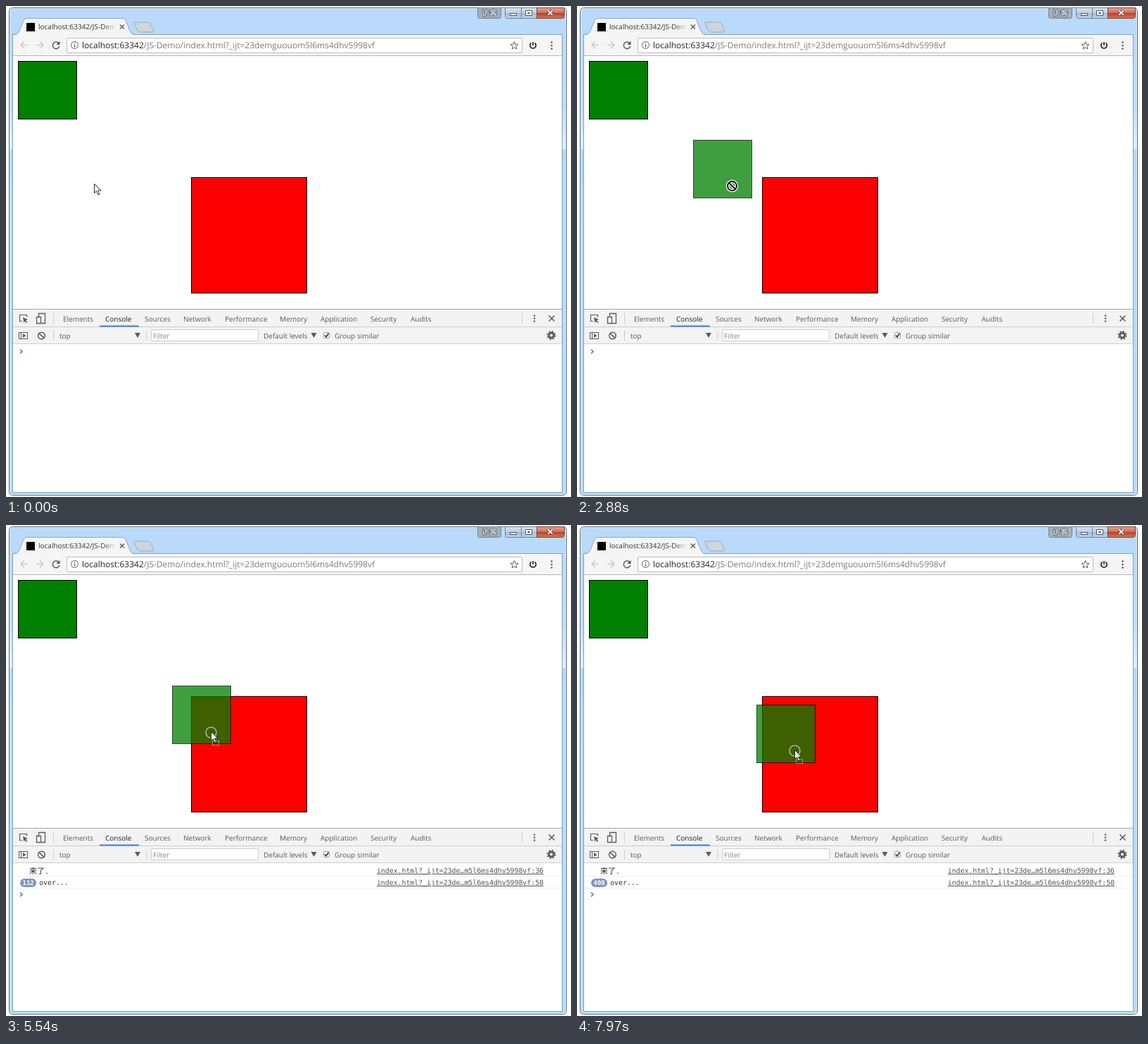
These frames come from a looping animation (803x697 px, 8000 ms). An HTML page:

```html
<!DOCTYPE html>
<html lang="en">
<head>
<meta charset="utf-8">
<title>Drag and drop demo</title>
<style>
html, body { margin: 0; width: 100%; height: 100%; overflow: hidden; background: #fff; }
svg { display: block; width: 803px; height: 697px; }
text { font: 10px "Open Sans", "Noto Sans", sans-serif; fill: #5a5a5a; white-space: pre; text-rendering: geometricPrecision; }
.url { font-size: 12px; }
.mono { font: 9.85px "DejaVu Sans Mono", monospace; fill: #303030; }
.link { fill: #545454; text-anchor: end; text-decoration: underline; }
.cjk { font: 11px "Noto Sans CJK SC", "Noto Sans CJK", sans-serif; fill: #222; }
.badge { font: bold 9px "DejaVu Sans Mono", monospace; fill: #fff; }
.line { fill: none; stroke: #5a5a5a; }
</style>
</head>
<body>
<svg viewBox="0 0 803 697" xmlns="http://www.w3.org/2000/svg">
  <defs>
    <linearGradient id="glass" x2="0" y2="1">
      <stop offset="0" stop-color="#b9dafb"/>
      <stop offset=".2" stop-color="#bcdcfc"/>
      <stop offset=".29" stop-color="#e3f0fd"/>
      <stop offset=".29" stop-color="#b0d9f9"/>
      <stop offset=".45" stop-color="#b7dcfb"/>
      <stop offset="1" stop-color="#b7dcfb"/>
    </linearGradient>
    <linearGradient id="button" x2="0" y2="1">
      <stop offset="0" stop-color="#d3e3f4"/>
      <stop offset=".5" stop-color="#bccfe3"/>
      <stop offset=".5" stop-color="#a3bad2"/>
      <stop offset="1" stop-color="#bdd5ec"/>
    </linearGradient>
    <linearGradient id="close" x2="0" y2="1">
      <stop offset="0" stop-color="#e2a294"/>
      <stop offset=".5" stop-color="#cf6c58"/>
      <stop offset=".5" stop-color="#b93d24"/>
      <stop offset="1" stop-color="#d47a55"/>
    </linearGradient>
    <linearGradient id="fade" gradientUnits="userSpaceOnUse" x1="138" x2="157">
      <stop offset="0" stop-color="#333"/>
      <stop offset="1" stop-color="#333" stop-opacity="0"/>
    </linearGradient>
  </defs>

  <!-- window frame -->
  <rect x="4.5" y="2.5" width="792" height="692" rx="5" fill="url(#glass)" stroke="#566b80"/>
  <rect x="5.5" y="3.5" width="790" height="690" rx="4" fill="none" stroke="#e6f3ff" stroke-opacity=".8"/>
  <g stroke="#6f8294">
    <path d="M670.5 2.5h33v12q0 3-3 3h-27q-3 0-3-3z" fill="#a4b1bf"/>
    <path d="M709.5 2.5h45v15h-42q-3 0-3-3z" fill="url(#button)"/>
    <path d="M732.5 3v14" fill="none"/>
    <path d="M754.5 2.5h39v12q0 3-3 3h-36z" fill="url(#close)" stroke="#7c4238"/>
  </g>
  <text class="cjk" x="676" y="14" style="fill:#fff;stroke:#5c6874;stroke-width:1.6px;paint-order:stroke">访客</text>
  <g fill="#fff" stroke="#4e5a68">
    <rect x="716.5" y="10.5" width="9" height="3"/>
    <path d="M738.5 6.5h9v7h-9zM741.5 9.5v1h3v-1z" fill-rule="evenodd"/>
    <path d="M770.5 6.5l6 6M776.5 6.5l-6 6" stroke="#6b3a34" stroke-width="4"/>
    <path d="M770.5 6.5l6 6M776.5 6.5l-6 6" stroke="#fff" stroke-width="2"/>
  </g>

  <!-- tab strip and toolbar -->
  <rect x="9.5" y="40.5" width="781" height="650" fill="#fff" stroke="#7fa0c0"/>
  <path d="M182 25q-1-2 2-2h18q2 0 3 2l5 10q0 2-2 2h-17q-3 0-4-2z" fill="#cdd5dd" stroke="#99a9ba"/>
  <rect x="10" y="41" width="780" height="29" fill="#f5f5f5"/>
  <path d="M10 41.5q6 0 8-4l7-17q1-3 5-3h135q4 0 5 3l7 17q2 4 7 4z" fill="#f5f5f5"/>
  <path d="M10 40.5q6 0 8-3l7-17q1-3 5-3h135q4 0 5 3l7 17q2 3 7 3" fill="none" stroke="#8aa6c3"/>
  <rect x="29" y="24" width="12" height="12" fill="#000"/>
  <text x="46" y="33" style="fill:url(#fade)">localhost:63342/JS-Dem</text>
  <path class="line" d="M162 26.5l6 6M168 26.5l-6 6" stroke-width="1.4"/>
  <path d="M10 70.5h780" stroke="#b6b6b6"/>
  <g class="line" stroke-width="1.5">
    <path d="M31 55.500h-10M26 50.500l-5 5 5 5M43 55.500h10M48 50.500l5 5-5 5" stroke="#cacaca"/>
    <path d="M75 53a4.800 4.800 0 1 0 .8 4"/>
  </g>
  <path d="M76.500 50v5h-5z" fill="#505050"/>
  <rect x="86.5" y="45.500" width="647" height="21" rx="1.500" fill="#fff" stroke="#bcbcbc"/>
  <circle class="line" cx="97.500" cy="55.500" r="5"/>
  <path class="line" d="M97.500 52.500v1.200M97.500 54.800v4" stroke-width="1.300"/>
  <text class="url" x="108" y="60" fill="#777" style="fill:#7b7b7b"><tspan fill="#222">localhost:63342</tspan>/JS-Demo/index.html?_ijt=23demguouom5l6ms4dhv5998vf</text>
  <path class="line" d="M722.500 50.500l1.500 3.700 4 .3-3.100 2.600 1 3.900-3.400-2.100-3.400 2.100 1-3.900-3.100-2.600 4-.3z"/>
  <path class="line" d="M746.500 52.500a4.200 4.200 0 1 0 5 0M749 51v5" stroke-width="1.600" style="stroke:#222"/>
  <g fill="#505050"><circle cx="775.500" cy="51.500" r="1.200"/><circle cx="775.500" cy="56" r="1.200"/><circle cx="775.500" cy="60.500" r="1.200"/></g>

  <!-- page -->
  <rect x="17.500" y="78.500" width="83" height="82" fill="#008000" stroke="#000"/>
  <rect x="263.500" y="243.500" width="164" height="164" fill="#f00" stroke="#000"/>

  <!-- developer tools -->
  <rect x="10" y="430" width="780" height="50" fill="#f3f3f3"/>
  <path d="M10 430.500h780" stroke="#a4a4a4"/>
  <path d="M10 455.500h780M10 479.500h780M67.500 436v15M733.500 436v15M67.500 461v14M199.500 461v14" stroke="#cdcdcd"/>
  <rect x="133" y="453.500" width="56" height="2" fill="#3b7fe8"/>
  <g class="line">
    <path d="M23 447.500h-3.500v-9h10v3" stroke-width="1.200"/>
    <path d="M24 442l7 3-3 1.300 2.500 2.700-1 1-2.700-2.500-1.300 2.500z" fill="#5a5a5a" stroke="none"/>
    <path d="M46.500 441v-4.500h9v14h-5M43.500 441.500h6v9h-6z" stroke-width="1.300"/>
    <path d="M771.500 439.500l8 8M779.500 439.500l-8 8" stroke-width="1.500"/>
    <rect x="18.500" y="463.500" width="12" height="9"/>
    <path d="M21.500 463v10"/>
    <path d="M24 465l4.500 3-4.500 3z" fill="#5a5a5a" stroke="none"/>
    <circle cx="50.500" cy="468" r="4.800" stroke-width="1.500"/>
    <path d="M47 464.600l7 6.800" stroke-width="1.500"/>
    <circle cx="775" cy="467.500" r="3.500" stroke-width="2.800"/>
    <circle cx="775" cy="467.500" r="5.600" stroke-width="1.800" stroke-dasharray="2.200"/>
  </g>
  <g fill="#5a5a5a">
    <circle cx="751" cy="439.500" r="1.200"/><circle cx="751" cy="443.500" r="1.200"/><circle cx="751" cy="447.500" r="1.200"/>
    <path d="M183 464h8l-4 7zM433.500 464h8l-4 7z"/>
  </g>
  <g id="tabs"></g>
  <text x="76" y="472">top</text>
  <rect x="206.500" y="459.500" width="152" height="16" rx="1" fill="#fff" stroke="#ccc"/>
  <text x="209" y="472" style="fill:#888">Filter</text>
  <text x="366" y="472">Default levels</text>
  <rect x="451.500" y="463.500" width="8" height="8" rx="1" fill="#f7f7f7" stroke="#9a9a9a"/>
  <path d="M453 467.500l2 2.200 3.500-5" fill="none" stroke="#333" stroke-width="1.600"/>
  <text x="467" y="472">Group similar</text>

  <g id="logs">
    <path d="M10 498.500h780M10 515.500h780" stroke="#f0f0f0"/>
    <text class="cjk" x="33" y="494.500">来了<tspan class="mono">.</tspan></text>
    <text class="mono link" x="764" y="494">index.html?_ijt=23de…m5l6ms4dhv5998vf:36</text>
    <text class="mono link" x="764" y="511">index.html?_ijt=23de…m5l6ms4dhv5998vf:50</text>
    <rect id="pill" x="20" y="502" height="12" rx="6" fill="#8097bd"/>
    <text id="count" class="badge" x="23.500" y="511.300"></text>
    <text id="over" class="mono" y="511">over...</text>
  </g>
  <path id="prompt" d="M20 487.500l3 3-3 3" fill="none" stroke="#3f82ee" stroke-width="1.600"/>

  <!-- dragged copy and pointer -->
  <rect id="ghost" x=".5" y=".5" width="83" height="82" fill="#008000" stroke="#000" opacity=".75"/>
  <g id="pointer">
    <circle id="ring" cx=".5" cy="1.500" r="7.500" fill="none" stroke="#d2d2d2" stroke-width="1.200"/>
    <g id="denied" fill="none">
      <g stroke="#fff" stroke-width="4.400"><circle cx=".5" cy=".5" r="6.500"/><path d="M-4 -4l9 9"/></g>
      <g stroke="#111" stroke-width="2"><circle cx=".5" cy=".5" r="6.500"/><path d="M-4 -4l9 9"/></g>
    </g>
    <path id="arrow" d="M.5 .5v13l3-2.800 2.300 5.300 2.200-1-2.300-5h4.300z" fill="#fff" stroke="#222"/>
    <rect id="drop" x="2.500" y="13.500" width="9" height="6" fill="none" stroke="#c9c9c9" stroke-dasharray="1.500 1"/>
  </g>
</svg>
<script>
const LOOP = 8000, PRESS = 1870, DRAG = 2020, ENTER = 4560;
const $ = id => document.getElementById(id);

// [time, x, y] of the dragged copy
const dragPath = [
  [2020, 24, 82], [2820, 158, 187], [2880, 165, 190], [3630, 196, 204],
  [3740, 198, 205], [3950, 198, 205], [4150, 205, 206], [4740, 212, 213],
  [5540, 236, 228], [6200, 258, 245], [6400, 267, 250], [7170, 285, 262],
  [7260, 285, 262], [7970, 255, 255]
];
const counts = [[4560, 1], [5540, 111], [6200, 207], [7170, 323], [7260, 323], [7970, 408]];

const tabs = [["Elements", 81], ["Console", 141], ["Sources", 197], ["Network", 252],
  ["Performance", 311], ["Memory", 389], ["Application", 447], ["Security", 518], ["Audits", 575]];
$("tabs").innerHTML = tabs.map(([name, x]) =>
  `<text x="${x}" y="448"${name === "Console" ? ' style="fill:#222"' : ""}>${name}</text>`).join("");

function along(points, t) {
  const i = points.findIndex(p => p[0] > t);
  if (i === 0) return points[0].slice(1);
  if (i < 0) return points[points.length - 1].slice(1);
  const a = points[i - 1], b = points[i], k = (t - a[0]) / (b[0] - a[0]);
  return a.slice(1).map((v, j) => v + (b[j + 1] - v) * k);
}

function pointerAt(t) {
  if (t >= DRAG) {
    const [x, y] = along(dragPath, t + 30); // the copy trails the pointer
    return [x + 53.5, y + 64];
  }
  if (t >= 1780) return along([[1780, 70, 148], [PRESS, 78, 149]], t);
  const k = Math.min(1, Math.max(0, (t - 1250) / 490));
  const e = k * k * (3 - 2 * k);
  return [125 - 55 * e, 252 - 104 * e];
}

const show = (id, on) => $(id).setAttribute("display", on ? "inline" : "none");
const move = (id, [x, y]) => $(id).setAttribute("transform", `translate(${Math.round(x)} ${Math.round(y)})`);

function draw(t) {
  const dragging = t >= DRAG, inside = t >= ENTER;
  move("pointer", pointerAt(t));
  move("ghost", along(dragPath, t));
  show("ghost", dragging);
  show("denied", dragging && !inside);
  show("arrow", !dragging || inside);
  show("drop", inside);
  show("ring", (t >= 870 && t < 1030) || (t >= PRESS && !dragging) || inside);
  show("logs", inside);
  move("prompt", [0, inside ? 34 : 0]);

  const tick = ENTER + Math.floor((t - ENTER + 10) / 30) * 30 - 10;
  const n = Math.round(along(counts, t >= 7970 ? t : tick + 10)[0]);
  const label = n > 1 ? String(n) : "";
  const width = label ? 7 + 5.4 * label.length : 0;
  $("count").textContent = label;
  $("pill").setAttribute("width", width);
  $("over").setAttribute("x", label ? 24 + width : 33);
}

function frame() {
  draw(performance.now() % LOOP);
  requestAnimationFrame(frame);
}
frame();
</script>
</body>
</html>
```
